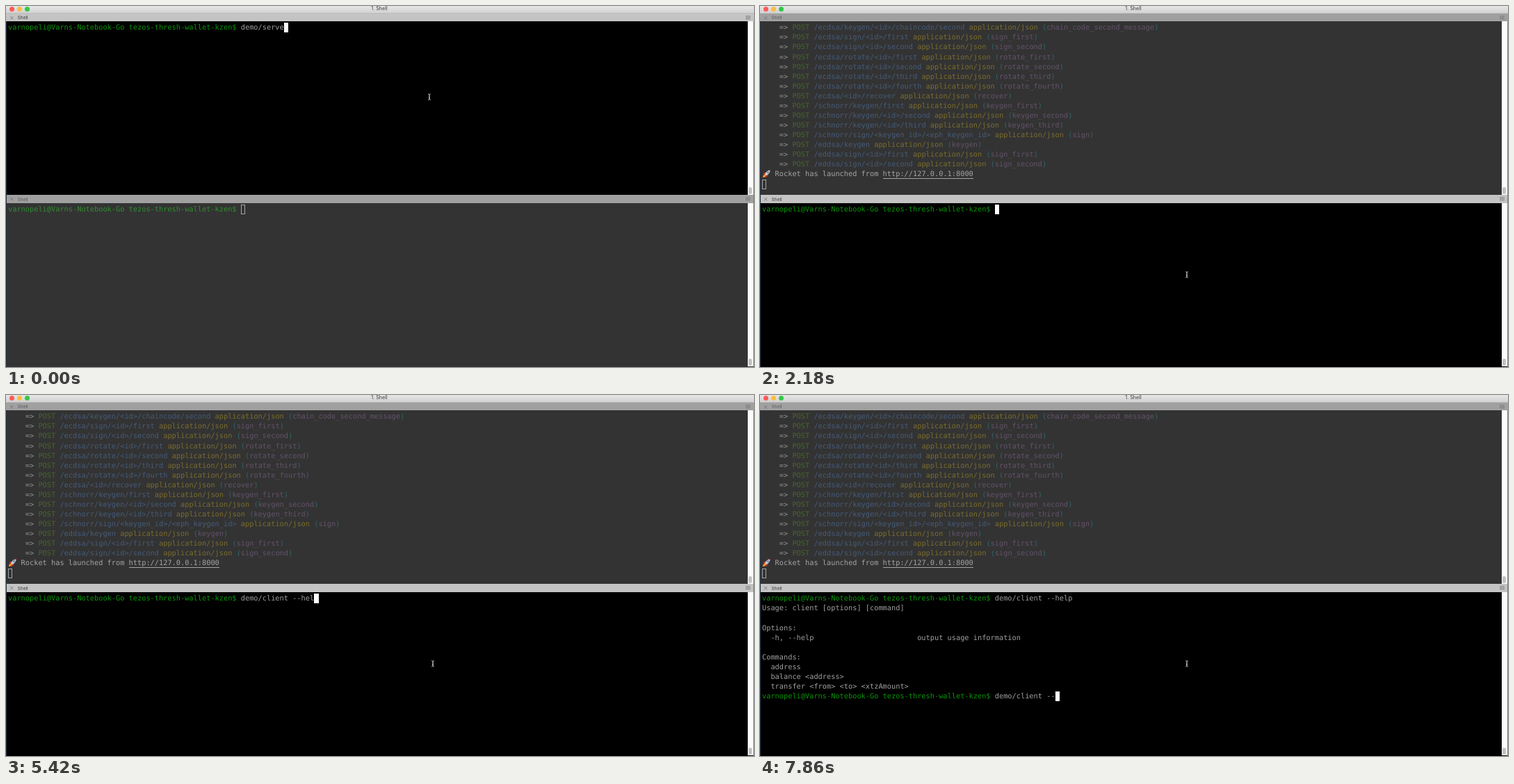
An HTML page for the animation above (8000 ms loop, 1076 by 520 pixels).

```html
<!DOCTYPE html>
<html lang="en">
<head>
<meta charset="utf-8">
<title>Shell</title>
<style>
  html, body { margin: 0; width: 100%; height: 100%; overflow: hidden; background: #000; }
  #stage { position: relative; width: 1076px; height: 520px; overflow: hidden; background: #000; }
  #stage * { box-sizing: border-box; }

  .title {
    position: absolute; inset: 0 0 auto; height: 11px;
    background: linear-gradient(#e6e6e6, #d2d2d2); border-bottom: 1px solid #bcbcbc;
    font: 7.2px/8px Inter, "Open Sans", sans-serif; color: #3c3c3c; text-align: center;
    padding-right: 2px;
  }
  .light { position: absolute; top: .5px; width: 7px; height: 7px; border-radius: 50%; }

  .pane {
    --bg: #333; --bar: #a0a0a0; --label: #5c5c5c; --prompt: #2f8e2f; --text: #929292; --strong: #a4a4a4;
    --verb: #48642e; --path: #455b7b; --type: #7b6d2d; --paren: #2f6768; --name: #63526a;
    position: absolute; left: 0; width: 1076px; background: var(--bg);
  }
  .pane.active {
    --bg: #000; --bar: #c4c4c4; --label: #3c3c3c; --prompt: #079607; --text: #a0a0a0; --strong: #b4b4b4;
    --verb: #386b0b; --path: #264a7c; --type: #8c7200; --paren: #066d6f; --name: #5d4163;
  }
  #server { top: 11px; height: 261px; }
  #client { top: 272px; height: 248px; }

  .bar {
    position: absolute; inset: 0 0 auto; height: 11px; background: var(--bar); color: var(--label);
    font: 6.6px/12px Inter, "Open Sans", sans-serif; padding-left: 16.5px;
  }
  #client .bar { height: 12px; line-height: 14px; }
  .bar svg { position: absolute; left: 0; top: 0; width: 1076px; height: 13px; fill: none; stroke: #707070; stroke-width: .8; }

  .screen {
    position: absolute; left: 3px; top: 13.3px; color: var(--text); white-space: pre;
    font: 10.3px/14.08px "DejaVu Sans Mono", monospace; text-rendering: geometricPrecision;
  }
  #client .screen { top: 14.3px; }
  .row { height: 14.08px; }
  .prompt { color: var(--prompt); }
  .verb { color: var(--verb); }
  .path { color: var(--path); }
  .type { color: var(--type); }
  .paren { color: var(--paren); }
  .name { color: var(--name); }
  .strong { color: var(--strong); }
  .url { border-bottom: 1px solid currentColor; }
  .rocket { position: absolute; left: 0; width: 13px; height: 13px; }

  .cursor { position: absolute; left: 0; top: 0; width: 6.4px; height: 14px; border: 1px solid #a4a4a4; }
  .active .cursor { background: #fff; border-color: #fff; }

  .scroll { position: absolute; left: 1067px; top: 11px; bottom: 0; width: 8px; background: #fcfcfc; }
  #client .scroll { top: 12px; bottom: 1px; }
  .scroll::after {
    content: ""; position: absolute; left: 1px; bottom: 1px; width: 5px; height: 10px;
    border-radius: 2.5px; background: #c2c2c2;
  }
  .edge { position: absolute; top: 22px; bottom: 0; width: 1px; }
  #mouse { position: absolute; left: -4px; top: -6px; width: 8px; height: 12px; fill: none; stroke: #d0d0d0; stroke-width: .8; }
</style>
</head>
<body>
<div id="stage">
  <div class="title">
    <i class="light" style="left:5px;background:#fc5b57"></i>
    <i class="light" style="left:16px;background:#fdbc40"></i>
    <i class="light" style="left:27px;background:#34c749"></i>1. Shell
  </div>
  <div class="pane" id="server"></div>
  <div class="pane" id="client"></div>
  <i class="edge" style="left:0;background:#242c40"></i>
  <i class="edge" style="right:0;background:#7c8092"></i>
  <svg id="mouse" viewBox="-4 -6 8 12">
    <path d="M-2 -4.3Q0 -4.3 0 -3V3Q0 4.3 -2 4.3M2 -4.3Q0 -4.3 0 -3V3Q0 4.3 2 4.3M-1 1.2H1"/>
  </svg>
</div>
<script>
const LOOP = 8000, CELL_W = 6.2, CELL_H = 14.08;
const PROMPT = 'varnopeli@Varns-Notebook-Go tezos-thresh-wallet-kzen$ ';

const escapeHtml = s => s.replace(/&/g, '&amp;').replace(/</g, '&lt;').replace(/>/g, '&gt;');
const span = (kind, s) => `<span class="${kind}">${escapeHtml(s)}</span>`;
const row = html => `<div class="row">${html}</div>`;
const promptRow = command => row(span('prompt', PROMPT) + escapeHtml(command));

const ROUTES = `
/ecdsa/keygen/<id>/chaincode/second chain_code_second_message
/ecdsa/sign/<id>/first sign_first
/ecdsa/sign/<id>/second sign_second
/ecdsa/rotate/<id>/first rotate_first
/ecdsa/rotate/<id>/second rotate_second
/ecdsa/rotate/<id>/third rotate_third
/ecdsa/rotate/<id>/fourth rotate_fourth
/ecdsa/<id>/recover recover
/schnorr/keygen/first keygen_first
/schnorr/keygen/<id>/second keygen_second
/schnorr/keygen/<id>/third keygen_third
/schnorr/sign/<keygen_id>/<eph_keygen_id> sign
/eddsa/keygen keygen
/eddsa/sign/<id>/first sign_first
/eddsa/sign/<id>/second sign_second`.trim().split('\n').map(line => line.split(' '));

const ROCKET = `<svg class="rocket" viewBox="0 0 13 13">
  <path d="M1 12Q1 8 4 8L5.5 9.5Q5 12 1 12Z" fill="#f59a23"/>
  <path d="M1 7L4 4.5 6 5 4 8ZM6 12L8.7 9 8 7 5 9Z" fill="#c9302c"/>
  <path d="M3.7 7.8Q6 2 12 1Q11.3 7 5.4 9.4Z" fill="#c5cbd0"/>
  <path d="M9.5 1.6Q11 1 12 1Q12 2.3 11.5 3.6Z" fill="#c9302c"/>
  <circle cx="8.5" cy="4.6" r="1.2" fill="#39698c"/></svg>`;

const SERVER_LOG = ROUTES.map(([path, name]) => row(
  `    ${escapeHtml('=>')} ${span('verb', 'POST')} ${span('path', path)} ${span('type', 'application/json')} ` +
  span('paren', '(') + span('name', name) + span('paren', ')')
)).join('') + row(ROCKET + span('strong', '   Rocket has launched from ') + span('strong url', 'http://127.0.0.1:8000'));

const HELP = `Usage: client [options] [command]

Options:
  -h, --help                        output usage information

Commands:
  address
  balance <address>
  transfer <from> <to> <xtzAmount>`.split('\n').map(line => row(escapeHtml(line))).join('');

// Each key list holds [start time, value], in order of time.
const at = (keys, t) => keys.reduce((value, [start, next]) => t >= start ? next : value, keys[0][1]);

const COMMAND = 'demo/client --help';
const TYPED = [[0, 0], [2630, 1], [2780, 3], [2940, 4], [3090, 5],
  [3360, 6], [3510, 8], [3650, 9], [3800, 11], [3940, 12],
  [4840, 13], [4990, 14], [5130, 15], [5280, 16], [5420, 17], [5560, 18]];
const RETYPED = [[0, 0], [7150, 18], [7450, 17], [7590, 16], [7720, 15], [7860, 14]];
const MOUSE = [[0, [609, 131]], [1580, [610, 205]], [1730, [613, 340]], [1880, [614, 387]]];

function serverView(t) {
  if (t >= 1140) return { html: SERVER_LOG, line: 16, col: 0 };
  const command = t < 150 ? 'demo/serve' : 'demo/server';
  return t < 780
    ? { html: promptRow(command), line: 0, col: PROMPT.length + command.length }
    : { html: promptRow(command), line: 1, col: 0 };
}

function clientView(t) {
  const command = COMMAND.slice(0, at(TYPED, t));
  const first = promptRow(command);
  if (t < 5710) return { html: first, line: 0, col: PROMPT.length + command.length };
  if (t < 6100) return { html: first, line: 1, col: 0 };
  const second = COMMAND.slice(0, at(RETYPED, t));
  return { html: first + HELP + promptRow(second), line: 10, col: PROMPT.length + second.length };
}

function makePane(id) {
  const pane = document.getElementById(id);
  pane.innerHTML = `<div class="bar">Shell<svg viewBox="0 0 1076 13">
    <path d="M6 4L10.5 8.5M10.5 4L6 8.5M1064 3.7H1071M1064 5.7H1071M1064 7.7H1071"/></svg></div>
    <div class="screen"><div class="cursor"></div><div class="lines"></div></div><div class="scroll"></div>`;
  const cursor = pane.querySelector('.cursor'), lines = pane.querySelector('.lines');
  let shown;
  return (view, active) => {
    pane.classList.toggle('active', active);
    if (view.html !== shown) lines.innerHTML = shown = view.html;
    cursor.style.left = `${view.col * CELL_W}px`;
    cursor.style.top = `${view.line * CELL_H}px`;
  };
}

const drawServer = makePane('server'), drawClient = makePane('client');
const mouse = document.getElementById('mouse');
const start = performance.now();

function render() {
  const t = Math.max(0, performance.now() - start) % LOOP;
  const clientActive = t >= 2180;
  drawServer(serverView(t), !clientActive);
  drawClient(clientView(t), clientActive);
  const [x, y] = at(MOUSE, t);
  mouse.style.transform = `translate(${x}px, ${y}px)`;
  requestAnimationFrame(render);
}
render();
</script>
</body>
</html>
```
